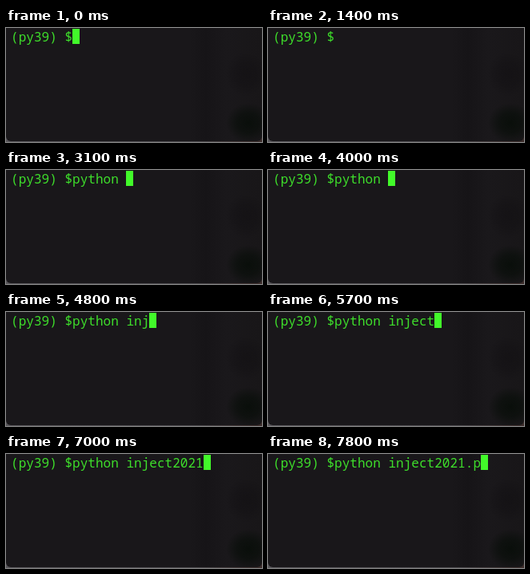
Write an HTML page with a canvas that moves like this. It is 320 px wide and 143 px high and loops after 8000 ms.

```html
<!DOCTYPE html>
<html lang="en">
<head>
<meta charset="utf-8">
<title>Terminal typing</title>
<style>
html, body { margin: 0; width: 100%; height: 100%; overflow: hidden; background: #19171a; }
canvas { display: block; }
</style>
</head>
<body>
<canvas id="stage" width="320" height="143"></canvas>
<script>
const ctx = document.getElementById('stage').getContext('2d');
const LOOP = 8000;
const PROMPT = '(py39) $';
const COMMAND = 'python inject2021.p';
const LEFT = 6, ADVANCE = 9.63, BASELINE = 17;

// One time in ms for each typed character.
const KEY_TIMES = [1800, 2000, 2200, 2300, 2500, 2700, 3100,
  4300, 4500, 4800, 5000, 5300, 5500, 6100, 6400, 6700, 7000, 7300, 7700];
const CURSOR_OFF = [[600, 900], [1400, 1800], [3500, 3900]];

function softBlot(x, y, rx, ry, rgb, alpha) {
  ctx.save();
  ctx.translate(x, y);
  ctx.scale(rx, ry);
  const glow = ctx.createRadialGradient(0, 0, 0, 0, 0, 1);
  glow.addColorStop(0, `rgba(${rgb},${alpha})`);
  glow.addColorStop(0.5, `rgba(${rgb},${alpha * 0.7})`);
  glow.addColorStop(1, `rgba(${rgb},0)`);
  ctx.fillStyle = glow;
  ctx.fillRect(-1, -1, 2, 2);
  ctx.restore();
}

function drawWindow() {
  const edge = ctx.createLinearGradient(0, 0, 320, 0);
  edge.addColorStop(0, '#58565a');
  edge.addColorStop(0.75, '#48464a');
  edge.addColorStop(1, '#3c2c2a');
  ctx.fillStyle = edge;
  ctx.fillRect(0, 0, 320, 143);

  ctx.save();
  ctx.beginPath();
  ctx.roundRect(0, -10, 320, 152, 6);
  ctx.clip();
  const pane = ctx.createLinearGradient(0, 0, 320, 0);
  pane.addColorStop(0, '#19171a');
  pane.addColorStop(0.72, '#19171a');
  pane.addColorStop(0.78, '#161417');
  pane.addColorStop(0.86, '#1a181b');
  pane.addColorStop(1, '#181618');
  ctx.fillStyle = pane;
  ctx.fillRect(0, 0, 320, 143);
  softBlot(300, 58, 26, 28, '14,12,15', 0.4);
  softBlot(303, 119, 28, 25, '7,13,8', 0.85);
  ctx.restore();
}

function drawTerminal(time) {
  const typed = KEY_TIMES.filter(key => time >= key).length;
  const line = PROMPT + COMMAND.slice(0, typed);
  ctx.fillStyle = '#3ede2b';
  ctx.font = '16px "Noto Sans Mono", "DejaVu Sans Mono", monospace';
  ctx.textBaseline = 'alphabetic';
  [...line].forEach((char, i) => ctx.fillText(char, LEFT + i * ADVANCE, BASELINE));

  const hidden = CURSOR_OFF.some(([from, to]) => time >= from && time < to);
  if (!hidden) {
    ctx.fillStyle = '#42fa2a';
    ctx.fillRect(Math.round(LEFT + line.length * ADVANCE), 1, 9, 19);
  }
}

const start = performance.now();
function frame() {
  drawWindow();
  drawTerminal((performance.now() - start) % LOOP);
  requestAnimationFrame(frame);
}
frame();
</script>
</body>
</html>
```
